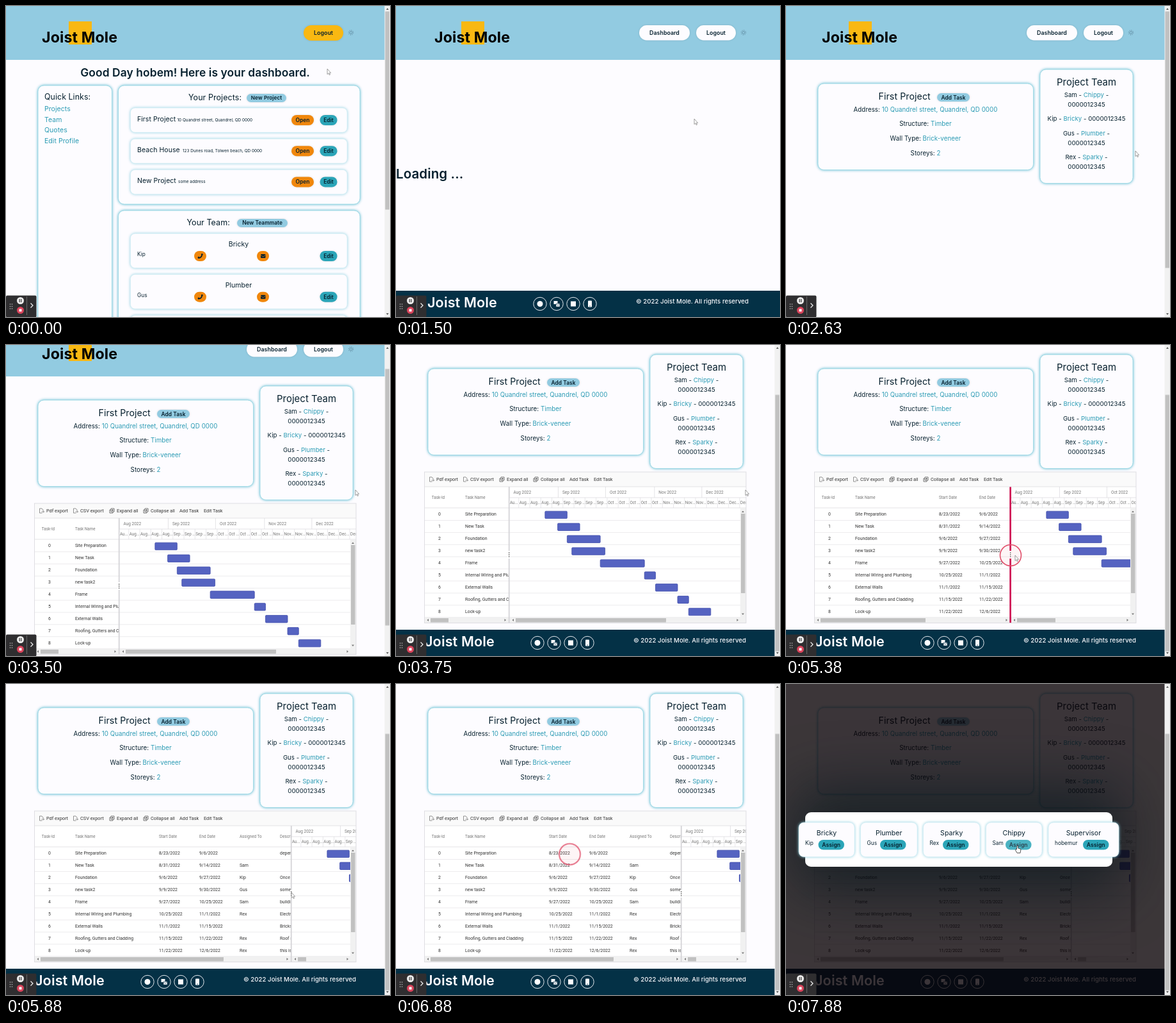
Recreate the animation shown at these times as an HTML page. Size 600 px wide and 485 px high, loop 8 s.

```html
<!DOCTYPE html>
<html lang="en">
<head>
<meta charset="utf-8">
<title>Building dashboard</title>
<style>
html, body { margin: 0; width: 100%; height: 100%; overflow: hidden; background: #fdfcff; }
svg { display: block; width: 600px; height: 485px; }
text { font-family: Inter, sans-serif; fill: #06202e; letter-spacing: .005em; white-space: pre; }
.mid { text-anchor: middle; }
.end { text-anchor: end; }
.medium { font-weight: 500; }
.semi { font-weight: 600; }
.bold { font-weight: 700; fill: #000; }
.link { fill: #2b9bb4; }
.light { fill: #fdfcff; }
.grid { font-family: Roboto, sans-serif; fill: #333; letter-spacing: 0; }
.grey { fill: #777; }
.card { fill: #fdfcff; stroke: #9bd8e5; stroke-width: .8; filter: drop-shadow(0 0 2px #4fb4cb); }
.row { fill: #fdfcff; stroke: #d3eef5; stroke-width: .6; filter: drop-shadow(0 0 2px #8fd0e0); }
.pill { filter: drop-shadow(0 .5px 1.5px #0002); }
#glow { filter: blur(45px); }
</style>
</head>
<body>
<svg id="stage" viewBox="0 0 600 485"></svg>
<script>
const LOOP = 8000;
const BRAND = 'Joist Mole', PHONE = '0000012345';
const HOME = '10 Quandrel street, Quandrel, QD 0000';
const crew = { Bricky: 'Kip', Plumber: 'Gus', Sparky: 'Rex', Chippy: 'Sam', Supervisor: 'hobemur' };
const SKY = '#92cbe1', YELLOW = '#f9b812', ORANGE = '#f0870c', TEAL = '#2ba5b8', NAVY = '#043146';

// y is the middle of the capitals
const text = (x, y, size, str, cls = '') =>
  `<text x="${x}" y="${y}" dy=".36em" font-size="${size}" class="${cls}">${str}</text>`;
const rect = (x, y, w, h, fill, r = 0, extra = '') =>
  `<rect x="${x}" y="${y}" width="${w}" height="${h}" rx="${r}" fill="${fill}" ${extra}/>`;
const box = (x1, y1, x2, y2, cls, r = 9) =>
  `<rect x="${x1}" y="${y1}" width="${x2 - x1}" height="${y2 - y1}" rx="${r}" class="${cls}"/>`;
const circle = (x, y, r, fill, extra = '') => `<circle cx="${x}" cy="${y}" r="${r}" fill="${fill}" ${extra}/>`;
const line = (d, stroke, width = 1) => `<path d="${d}" fill="none" stroke="${stroke}" stroke-width="${width}"/>`;
const shape = (d, fill) => `<path d="${d}" fill="${fill}"/>`;
const group = (content, { id = '', x = 0, y = 0, extra = '' } = {}) =>
  `<g ${id && `id="${id}"`} ${x || y ? `transform="translate(${x} ${y})"` : ''} ${extra}>${content}</g>`;
const pill = (x, y, w, h, fill, label, size = 8.4, extra = 'class="pill"') =>
  rect(x, y, w, h, fill, h / 2, extra) + text(x + w / 2, y + h / 2, size, label, 'mid semi');
const link = str => `<tspan class="link">${str}</tspan>`;

const sun = circle(539, 41.5, 2, 'none', 'stroke="#4a7186" stroke-width=".6"') +
  circle(539, 41.5, 3.7, 'none', 'stroke="#4a7186" stroke-width=".9" stroke-dasharray="1 1.9"');
const header = buttons => rect(-10, 0, 620, 84, SKY) + rect(98, 24, 36, 36, YELLOW) +
  text(56, 48.5, 23.2, BRAND, 'bold') + buttons + sun;
const navButtons = pill(376, 30, 79, 23.5, '#fdfcff', 'Dashboard', 8.8) + pill(465, 30, 62, 23.5, '#fdfcff', 'Logout', 8.8);

const badges = [221, 247, 273, 299].map(x =>
  circle(x, 464.5, 10.2, 'none', 'stroke="#fdfcff" stroke-width=".9"')).join('');
const footer = rect(-10, 444, 620, 41, NAVY) + text(45, 462.5, 21.6, BRAND, 'semi light') + badges +
  circle(221, 464.5, 4.5, '#fdfcff') +
  rect(242.5, 460, 6, 5, '#fdfcff') + rect(246, 464, 6, 5, '#fdfcff', .5, `stroke="${NAVY}" stroke-width=".6"`) +
  line('M246.5 465l2.5 2l2.5 -2', NAVY, .6) +
  rect(269, 460.5, 8, 8, '#fdfcff') +
  rect(296, 459.5, 6, 10, '#fdfcff', 1) + circle(299, 468, .7, NAVY) +
  text(547, 460.5, 9.6, `© 2022 ${BRAND}. All rights reserved`, 'end medium light');

const scrollbar = (height, id) => rect(591.5, 0, 8.5, 485, '#f1f1f1') +
  rect(592.5, 8.5, 6.5, height, '#c1c1c1', 0, id && `id="${id}"`) +
  shape('M594 6h4l-2 -3zM594 479h4l-2 3z', '#666');

// Dashboard
const editButton = y => pill(490.5, y, 27, 16, TEAL, 'Edit');
const projectRow = ([name, offset, address], i) => {
  const y = 159 + i * 48.2;
  return box(194.5, y, 533, y + 38, 'row', 7) + text(205, y + 17, 10.5, name) +
    text(offset, y + 18.5, 6.35, address) + pill(446, y + 11, 35, 16, ORANGE, 'Open') + editButton(y + 11);
};
const iconButtons = y => rect(294, y, 19, 16, ORANGE, 8) + rect(392, y, 19, 16, ORANGE, 8) +
  line(`M300.6 ${y + 11}q5 0 6 -6`, '#06202e', 1.7) + line(`M300 ${y + 11}l2 -1.5M305.7 ${y + 6.4}l1.2 -2`, '#06202e', 2.2) +
  rect(398, y + 5, 7.5, 6, '#06202e', 1) + line(`M398 ${y + 6.5}l3.7 2.5l3.8 -2.5`, ORANGE, .7);
const teamRow = (role, i) => {
  const y = 355 + i * 63.7;
  return box(194.5, y, 533, y + 53.5, 'row', 7) + text(363.5, y + 16.5, 10.5, role, 'mid') +
    text(205, y + 32, 8.3, crew[role]) + iconButtons(y + 27) + editButton(y + 27);
};
const dashboard = header(pill(465, 30, 62, 24, YELLOW, 'Logout', 8.8)) +
  text(295.5, 104, 17.4, 'Good Day hobem! Here is your dashboard.', 'mid semi') +
  box(50, 124, 165.5, 520, 'card') + text(60, 142, 12.4, 'Quick Links:') +
  ['Projects', 'Team', 'Quotes', 'Edit Profile'].map((s, i) => text(60, 160 + i * 16.8, 10.5, s, 'link')).join('') +
  box(175.5, 124, 553, 309, 'card') + text(285, 142, 12.5, 'Your Projects:') +
  pill(376, 137, 62, 13, SKY, 'New Project', 8.2) +
  [['First Project', 267.5, HOME], ['Beach House', 276, '123 Dunes road, Tolwen beach, QD 0000'],
   ['New Project', 269, 'some address']].map(projectRow).join('') +
  box(175.5, 319, 553, 560, 'card') + text(282.5, 337.5, 12.5, 'Your Team:') +
  pill(361, 332, 79, 13, SKY, 'New Teammate', 8.3) +
  ['Bricky', 'Plumber', 'Sparky'].map(teamRow).join('') + scrollbar(309, '');

const loading = rect(0, 0, 600, 485, '#fdfcff') + group(header(navButtons) + footer, { x: 4 }) +
  text(0, 262, 20.5, 'Loading ...', 'semi');

// Gantt grid; days count from 1 August 2022
const DAY = 2.466;
const dateOf = day => new Date(2022, 7, 1 + day);
const monthOf = day => dateOf(day).toLocaleDateString('en-US', { month: 'short' });
const { Bricky, Plumber, Sparky, Chippy } = crew;
const tasks = [
  ['Site Preparation', 22, 36, '', 'depends on'], ['New Task', 30, 44, Chippy, ''],
  ['Foundation', 36, 57, Bricky, 'Once the'], ['new task2', 39, 60, Plumber, 'some text'],
  ['Frame', 57, 85, Chippy, 'building'], ['Internal Wiring and Plumbing', 85, 92, Sparky, 'Electrician'],
  ['External Walls', 92, 106, '', 'Bricks and'], ['Roofing, Gutters and Cladding', 106, 113, Sparky, 'Roof sheets'],
  ['Lock-up', 113, 127, Sparky, 'this is the']
];
const columns = [108, 239, 302, 365, 428];
const rowY = i => 264 + i * 18.9;
const rowLines = tasks.map((_, i) => line(`M45 ${rowY(i) + 9.5}H547`, '#e4e3e6', .7)).join('');

const exportIcon = x => line(`M${x + 4.5} 213h-4v-7h3.5l2 2v1.5M${x + 3.5} 211h4m-1.5 -1.5l1.5 1.5l-1.5 1.5`, '#666', .7);
const stackIcon = x => line(`M${x + 2} 206h5v5h-5zM${x + 2} 208h-2v5h5v-2M${x + 3} 208.5h3M${x + 4.5} 207v3`, '#555', .8);
const toolbar = rect(45, 198, 502, 23, '#fafafa') + exportIcon(52) + exportIcon(105) + stackIcon(162) + stackIcon(215) +
  [[63, 'Pdf export'], [116, 'CSV export'], [173, 'Expand all'], [226, 'Collapse all'], [271, 'Add Task'], [309, 'Edit Task']]
    .map(([x, s]) => text(x, 209.5, 7.35, s, 'grid')).join('');

const tablePane = rect(45, 221, 502, 213, '#fff') + rowLines + line('M45 254H547', '#dddce0', .8) +
  text(66, 238, 6.3, 'Task-Id', 'grid grey mid') +
  ['Task Name', 'Start Date', 'End Date', 'Assigned To', 'Description']
    .map((s, i) => text(columns[i], 238, 6.3, s, 'grid grey')).join('') +
  tasks.map(([name, from, to, who, note], i) => text(68, rowY(i), 6.9, i, 'grid mid') +
    [name, dateOf(from).toLocaleDateString('en-US'), dateOf(to).toLocaleDateString('en-US'), who, note]
      .map((s, c) => text(columns[c], rowY(i), 6.9, s, 'grid')).join('')).join('') +
  rect(45, 425, 502, 9, '#f1f1f1') + shape('M51 427v4l-2.5 -2z', '#777') +
  group(rect(0, 426, 1, 6.5, '#c1c1c1', 0, 'id="tableThumb"'), { x: 54 });

const weeks = Array.from({ length: 21 }, (_, i) => 6 + i * 7).map(day => {
  const month = monthOf(day), x = 177 + day * DAY;
  return line(`M${x} 238V254`, '#dddce0', .7) +
    text(x + 1, 246, 6.3, month + (/Sep|Oct/.test(month) ? ' ...' : '...'), 'grid grey');
}).join('');
const months = [0, 31, 61, 92, 122].map(day => {
  const x = 177 + day * DAY;
  return line(`M${x} 221V238`, '#dddce0', .8) + text(x + 6.5, 229.5, 6.5, monthOf(day) + ' 2022', 'grid grey');
}).join('');
const bars = tasks.map(([, from, to], i) => rect(178.6 + from * DAY, rowY(i) - 4.8, (to - from) * DAY, 11.4,
  '#5563c1', 1.2, 'stroke="#4350ac" stroke-width=".8"')).join('');
const chartPane = rect(176, 221, 400, 213, '#fff') + group(rowLines, { x: 132 }) +
  line('M177 238H570M177 254H570', '#dddce0', .8) + weeks + months + text(178, 246, 6.3, 'Au...', 'grid grey') + bars +
  rect(176, 425, 400, 9, '#f1f1f1') + group(rect(0, 426, 1, 6.5, '#c1c1c1', 0, 'id="chartThumb"'), { x: 187 }) +
  shape('M184 427v4l-2.5 -2zM169.5 427v4l2.5 -2z', '#777') +
  rect(175.8, 221, 1.8, 213, '#d5d4d8') + rect(175.3, 221, 2.6, 213, '#cf1150', 0, 'id="grip"') +
  rect(175, 321, 3, 12, '#fff') + [324, 327, 330].map(y => rect(176, y - .6, 1.3, 1.3, '#333')).join('');
const grid = group(toolbar + tablePane + group(chartPane, { id: 'chart' }) +
  rect(538, 254, 9, 171, '#f1f1f1') + rect(539, 263, 6.5, 124, '#c1c1c1') +
  shape('M540 261h4l-2 -2.5zM540 418.5h4l-2 2.5z', '#777') +
  rect(538, 425, 9, 9, '#f1f1f1') + shape('M532.5 427v4l2.5 -2z', '#777') +
  line('M45 221H547', '#dddce0', .8), { extra: 'clip-path="url(#gridArea)"' });

// Project page
const teamLines = [[55, `${Chippy} - ${link('Chippy')} -`], [69.5, PHONE], [92, `${Bricky} - ${link('Bricky')} - ${PHONE}`],
  [115, `${Plumber} - ${link('Plumber')} -`], [129.5, PHONE], [152, `${Sparky} - ${link('Sparky')} -`], [166.5, PHONE]];
const details = [['Address', HOME], ['Structure', 'Timber'], ['Wall Type', 'Brick-veneer'], ['Storeys', '2']];
const project = header(navButtons) + group(
  box(50, 37, 386.5, 171.5, 'card') + text(144.5, 56.5, 14.2, 'First Project') +
  pill(236, 52, 51, 13, SKY, 'Add Task', 8.4) +
  details.map(([k, v], i) => text(218, 77 + i * 22.8, 9.75, `${k}: ${link(v)}`, 'mid')).join('') +
  box(397, 15, 542, 192.5, 'card') + text(469.5, 35, 14.9, 'Project Team', 'mid') +
  teamLines.map(([y, s]) => text(469.5, y, 9.6, s, 'mid')).join('') +
  `<g id="gantt">${grid}${rect(44.5, 198, 502.5, 235.5, 'none', 0, 'stroke="#dcdbe0" stroke-width=".9"')}</g>` +
  footer, { y: 84 });

// Assign dialog
const assignCard = ([x1, x2, role]) => {
  const nameX = x1 + 10, buttonX = x1 + (role === 'Supervisor' ? 54 : 30.5);
  return box(x1, 216, x2, 269.5, 'row', 8) + text((x1 + x2) / 2, 232.5, 10.5, role, 'mid') +
    text(nameX, 248, 8.3, crew[role]) + pill(buttonX, 243, 40.5, 15.5, TEAL, 'Assign', 8.6, '');
};
const dialog = rect(10, 160, 520, 165, '#04141c', 40, 'id="glow" fill-opacity=".6"') + rect(30, 200, 480, 85, '#fff', 9) +
  [[20, 107, 'Bricky'], [116.5, 205, 'Plumber'], [214.5, 303, 'Sparky'], [312.5, 400, 'Chippy'], [410, 520, 'Supervisor']]
    .map(assignCard).join('') +
  rect(343, 243, 40.5, 15.5, '#fff', 7.8, 'id="hover" fill-opacity=".15"');

const recorder = rect(0, 451.5, 47.5, 34, '#2f2e30', 2) +
  [465, 468.5, 472].map(y => circle(6.5, y, .8, '#bbb') + circle(9.5, y, .8, '#bbb')).join('') +
  circle(22.5, 459.5, 5.5, '#ececec') + line('M21.2 457v5M23.8 457v5', '#333', 1.2) +
  circle(22.5, 474.5, 5.5, '#d8435a') + rect(20.5, 472.5, 4, 4, '#fff') +
  line('M32.5 453V482', '#777', .8) + line('M38.5 463.5l3.5 3.5l-3.5 3.5', '#eee', 1.3);

const arrow = '<path d="M0 0V8.5L1.9 6.8L3.2 9.6L4.5 9L3.2 6.3H5.6Z" fill="#fff" stroke="#777" stroke-width=".7"/>';
const hand = '<path d="M1.5 .5V6L0 5.5L-.5 7L2 11.5H7L8 5.5L3.5 4V.5Z" fill="#fff" stroke="#444" stroke-width=".9"/>';

document.getElementById('stage').innerHTML =
  `<defs><clipPath id="gridArea"><rect x="45" y="198" width="502" height="236"/></clipPath></defs>` +
  group(dashboard, { id: 'dashboard' }) + group(loading, { id: 'loading' }) +
  `<g id="projectScene"><g id="page">${project}</g>` + rect(0, 0, 592, 485, '#080004', 0, 'id="shade"') +
  group(dialog, { id: 'dialog' }) + scrollbar(400, 'pageThumb') + '</g>' + recorder +
  circle(0, 0, 16.5, '#e0506b', 'id="ring" fill-opacity=".06" stroke="#e0506b" stroke-width="1.6"') +
  group(arrow, { id: 'arrow' }) + group(hand, { id: 'hand' });

// Stepped CSS keyframes from [ms, ...values] entries
const sheet = document.head.appendChild(document.createElement('style'));
const animate = (id, entries, css) => {
  const steps = entries.map(([ms, ...v]) => `${ms / LOOP * 100}%{${css(...v)}}`).join('');
  sheet.textContent += `@keyframes ${id}{${steps}}#${id}{animation:${id} ${LOOP}ms step-end infinite}`;
};
const opacity = v => `opacity:${v}`;
const move = (x, y, o = 1) => `transform:translate(${x}px,${y}px);opacity:${o}`;
const show = (id, from, to) => animate(id, [[0, 0], [from, 1], ...(to ? [[to, 0]] : [])], opacity);

animate('dashboard', [[0, 1], [1250, 0]], opacity);
show('loading', 1250, 2630);
show('projectScene', 2630);
show('gantt', 2750);
show('grip', 5000, 5880);
show('hover', 7750);
animate('shade', [[0, 0], [7000, .5], [7130, .79]], opacity);
animate('dialog', [[0, 0], [7000, .6], [7130, 1]], opacity);

const scroll = [[0, 0], [3500, 35], [3630, 70], [3750, 84]];
animate('page', scroll, y => move(0, -y));
animate('pageThumb', scroll, y => move(0, y * 469 / 569));

const drag = [[0, 0], [5130, 30], [5250, 95], [5380, 174], [5500, 225], [5630, 258], [5750, 269]];
animate('chart', drag, x => move(x, 0));
animate('tableThumb', drag, x => `transform:scaleX(${(114 + x) * (132 + x) / 537})`);
animate('chartThumb', drag, x => `transform:scaleX(${(343 - x) * (361 - x) / 527})`);

const dragSteps = drag.slice(1);
animate('ring', [[0, 466, 178, 0], [1000, 466, 178], [1250, 466, 178, 0], [5000, 177, 328],
  ...dragSteps.slice(0, -1).map(([ms, x]) => [ms, 177 + x, 328]),
  [5750, 446, 328, 0], [6750, 271.5, 265.5], [7000, 271.5, 265.5, 0]], move);
animate('arrow', [[0, 502, 98], [130, 512, 110], [250, 540, 146], [380, 567, 169], [500, 577, 177],
  [750, 560, 178], [880, 508, 178], [1000, 466, 176], [1750, 471, 178], [1880, 488, 188], [2000, 510, 202],
  [2130, 529, 215], [2250, 541, 223], [2380, 546, 226], [4000, 532, 231], [4130, 470, 252], [4250, 380, 286],
  [4380, 280, 320], [4500, 205, 342], [4630, 183, 342, 0], [5000, 184, 328],
  ...dragSteps.map(([ms, x]) => [ms, 184 + x, 328]),
  [5880, 446, 325], [6000, 420, 315], [6130, 380, 300], [6250, 340, 286], [6380, 305, 274], [6500, 282, 264],
  [6630, 271, 260, 0], [7130, 275, 259], [7500, 292, 258], [7630, 322, 256], [7750, 348, 253, 0]], move);
animate('hand', [[0, 0, 0, 0], [7750, 348, 253], [7880, 359, 252]], move);
</script>
</body>
</html>
```
